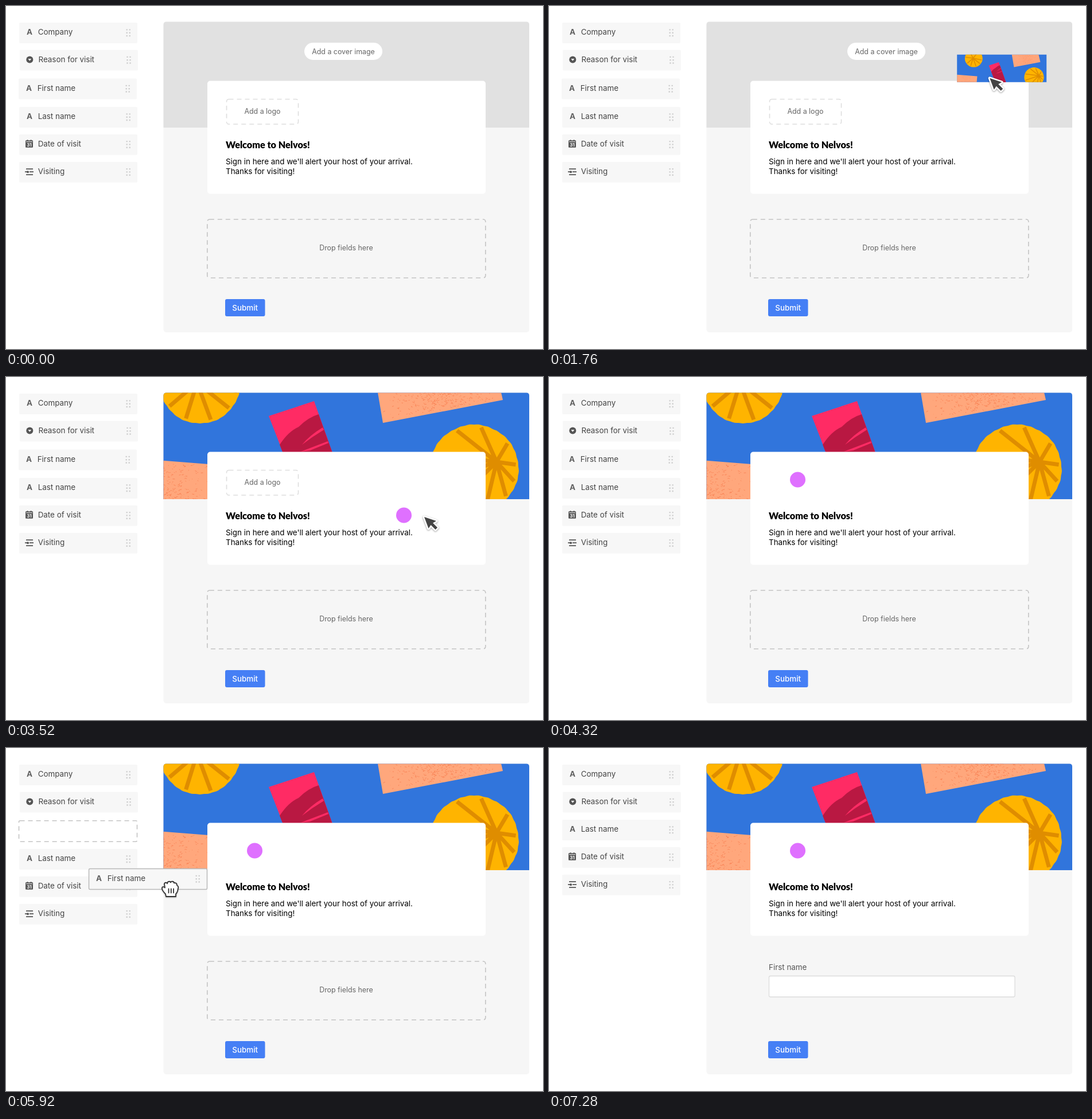
Write an HTML page that moves like this. It is 936 px wide and 598 px high and loops after 8000 ms.

```html
<!DOCTYPE html>
<html lang="en">
<head>
<meta charset="utf-8">
<title>Form builder</title>
<style>
  html, body { margin: 0; width: 100%; height: 100%; overflow: hidden; background: #fff; }
  #stage { display: block; width: 936px; height: 598px; font: 13.4px Inter, sans-serif; fill: #444; }
  .small { font-size: 12.4px; fill: #666; text-anchor: middle; }
  .dash { fill: none; stroke: #c4c4c4; stroke-width: 1.6; stroke-dasharray: 8 6; }
  .glyph { font-weight: 700; fill: #606060; }
  .pointer { fill: #444; stroke: #fff; stroke-width: 5; stroke-linejoin: round; paint-order: stroke;
    filter: drop-shadow(0 1px 1.5px #0006); }
</style>
</head>
<body>
<svg id="stage" viewBox="0 0 936 598">
  <defs>
    <clipPath id="coverClip"><path d="M274.500 213V32.500q0-5 5-5H907q5 0 5 5V213z"/></clipPath>
    <path id="pointer" class="pointer" d="M0 0L7.500 20 11.500 14 19.500 22 23 18.500 15 10.500 21 7z"/>
    <path id="grip" stroke="#d0d0d0" stroke-width="2.400" stroke-dasharray="2.400 2.900" d="M187.700 11.200v14M192.700 11.200v14"/>
    <g id="art">
      <path fill="#3175dc" d="M200-25h720v250H200z"/>
      <path id="lemonLeft" fill="#ffb400"/>
      <path id="lemonRight" fill="#ffb400"/>
      <path id="spokes" fill="none" stroke="#df8d00" stroke-width="7"/>
      <path fill="#ff2b64" d="M458 68L537 42 595 205 525 240z"/>
      <path fill="#b91842" d="M477 118Q492 95 510 87 527 70 545 65L595 205 525 240z"/>
      <path fill="#ff2b64" d="M516 118Q530 101 552 88L554 92Q534 104 516 118zM514 130L561 112 562 115 530 128z"/>
      <path fill="#ffa77c" d="M200 140L366 153 358 240 200 240zM640-20L657 80 866 40 852-20z"/>
      <path id="grain" fill="none" stroke="#f4683a" stroke-width=".9" opacity=".6"/>
    </g>
  </defs>

  <rect x="274.500" y="27.500" width="637.500" height="541.500" rx="5" fill="#f6f6f6"/>
  <path fill="#e1e1e1" d="M274.500 212V32.500q0-5 5-5H907q5 0 5 5V212z"/>
  <rect x="520" y="64" width="136" height="30" rx="15" fill="#fff"/>
  <text class="small" x="588" y="83.500">Add a cover image</text>
  <g id="cover" clip-path="url(#coverClip)"><use href="#art"/></g>

  <rect x="351" y="130.500" width="485" height="197" rx="5" fill="#fff"/>
  <g id="logoSlot">
    <rect class="dash" x="384.500" y="162.500" width="125" height="43.500" rx="4" style="stroke:#dedede"/>
    <text class="small" x="447" y="187.500">Add a logo</text>
  </g>
  <text x="383" y="248" fill="#000" style="font:900 16.200px Lato,sans-serif">Welcome to Nelvos!</text>
  <text x="383" y="275.500" fill="#000">Sign in here and we'll alert your host of your arrival.</text>
  <text x="383" y="293" fill="#000">Thanks for visiting!</text>

  <g id="dropZone">
    <rect class="dash" x="350.800" y="372" width="485" height="102" rx="4"/>
    <text class="small" x="593" y="426">Drop fields here</text>
  </g>
  <g id="field">
    <text x="383" y="386.500" fill="#555">First name</text>
    <rect x="383.500" y="397.500" width="428.500" height="36.500" rx="2.500" fill="#fff" stroke="#dcdcdc" stroke-width="1.300"/>
  </g>
  <rect x="382" y="511" width="69.500" height="30" rx="3" fill="#457ff5"/>
  <text x="416.700" y="530.500" fill="#fff" text-anchor="middle" font-weight="500">Submit</text>

  <g id="fixedItems"></g>
  <rect id="gap" class="dash" x="22.500" y="126.700" width="206" height="36.500" rx="2"/>
  <g id="looseItems"></g>

  <g id="thumb">
    <svg width="156" height="48" viewBox="205.800 -18.500 709 218.200"><use href="#art"/></svg>
    <use href="#pointer" x="57" y="41"/>
  </g>
  <g id="logo">
    <circle cx="50.500" cy="13" r="13.500" fill="#df70ff"/>
    <use id="logoPointer" href="#pointer" x="86" y="16"/>
  </g>
  <g id="drag">
    <g id="dragItem"></g>
    <g id="hand" transform="translate(127 21.500)" stroke="#333" stroke-width="1.800" stroke-linecap="round" stroke-linejoin="round">
      <path fill="#fff" style="filter:drop-shadow(0 1px 1px #0004)" d="M8 27.500L7 23C4 20 1 16 1 13 1 10 4 10 6 12L5 6C5 3 9 2 10 5 10 1 15 0 16 3 17 0 22 1 22 4 24 3 27 4 27 8 29 9 30 10 29 13L28 18Q27 21 25 23V27.500z"/>
      <path fill="none" d="M12.500 14v7M16.800 14v7M21 14v7"/>
    </g>
  </g>
</svg>
<script>
const LOOP = 8000, STEP = 80;
const $ = id => document.getElementById(id);

// Sidebar
const icons = {
  text: '<text class="glyph" x="13" y="21">A</text>',
  choice: '<circle cx="17.500" cy="17" r="6" fill="#555"/><path fill="#fff" d="M14.700 15.500h5.600l-2.800 3.700z"/>',
  date: `<path fill="#555" d="M11 11.500q0-1 1-1h1.500v-1h2v1h4v-1h2v1H23q1 0 1 1V22q0 1-1 1H12q-1 0-1-1z"/>
    <path stroke="#f7f7f7" d="M12 13h11"/><text x="17.500" y="21" text-anchor="middle" fill="#fff" font-size="8" font-weight="700">31</text>`,
  visit: '<path stroke="#555" stroke-width="1.800" d="M12 12.500h12M10 17.500h6M18 17.500h7M12 22.500h12"/><circle cx="15" cy="17.500" r="2" fill="#555"/>'
};
const item = (x, y, icon, label) => `<g transform="translate(${x} ${y})">
  <rect width="206" height="36" rx="2" fill="#f7f7f7"/>${icons[icon]}
  <text x="32.700" y="21">${label}</text><use href="#grip"/></g>`;

$('fixedItems').innerHTML = item(23, 29, 'text', 'Company') + item(23.8, 76.5, 'choice', 'Reason for visit');
$('looseItems').innerHTML = item(23, 176, 'text', 'Last name') +
  item(23, 223.7, 'date', 'Date of visit') + item(23, 271.7, 'visit', 'Visiting');
$('dragItem').innerHTML = item(0, 0.5, 'text', 'First name') +
  '<rect id="outline" x=".5" y=".5" width="206" height="36" rx="2" fill="none" stroke="#b9b9b9" stroke-width="1.500"/>';

// Cover artwork
const polar = (cx, cy, rx, ry, a) => `${(cx + rx * Math.cos(a)).toFixed(1)} ${(cy + ry * Math.sin(a)).toFixed(1)}`;
const blob = (cx, cy, rx, ry) => 'M' + Array.from({ length: 120 }, (_, i) => {
  const a = i * Math.PI / 60, k = 1 + 0.005 * Math.sin(7 * a) + 0.005 * Math.sin(29 * a);
  return polar(cx, cy, rx * k, ry * k, a);
}).join('L') + 'z';
const rays = (hx, hy, cx, cy, rx, ry, angles) =>
  angles.map(a => `M${hx} ${hy}L${polar(cx, cy, rx, ry, a)}`).join('');
$('lemonLeft').setAttribute('d', blob(338, 12, 70, 69));
$('lemonRight').setAttribute('d', blob(816, 160, 77.5, 77));
$('spokes').setAttribute('d',
  rays(333, 10, 338, 12, 66, 65, [0.2, 0.7, 1.28, 1.95, 2.5, 3.3, 4.2, 5.3]) +
  rays(855, 148, 816, 160, 73, 73, [-0.65, -0.1, 0.3, 0.71, 1.3, 2.1, 2.8, 3.5, 4.29, 4.88]));

let seed = 7;
const random = () => (seed = seed * 16807 % 2147483647) / 2147483647;
let grain = '';
for (let i = 0; i < 900; i++) {
  const u = (random() + random()) / 2, v = random();
  const [x, y] = i % 3 ? [652 + u * 204, -15 + v * (92 - u * 38)] : [205 + u * 150, 147 + u * 8 + v * 70];
  grain += `M${x.toFixed(1)} ${y.toFixed(1)}l${(random() * 5 - 1).toFixed(1)} ${(random() * 4 - 2).toFixed(1)}`;
}
$('grain').setAttribute('d', grain);

// Motion: smooth curve through keys of [time, ...values], at rest at both ends
function glide(t, keys) {
  const last = keys.length - 1;
  if (t <= keys[0][0]) return keys[0].slice(1);
  if (t >= keys[last][0]) return keys[last].slice(1);
  const i = keys.findIndex(k => k[0] > t) - 1, [a, b] = [keys[i], keys[i + 1]];
  const slope = (j, n) => (keys[j + 1][n] - keys[j][n]) / (keys[j + 1][0] - keys[j][0]);
  const tangent = (j, n) => j === 0 || j === last ? 0 : (slope(j - 1, n) + slope(j, n)) / 2;
  const d = b[0] - a[0], s = (t - a[0]) / d, r = 1 - s;
  return a.slice(1).map((v, k) => {
    const n = k + 1;
    return v + (b[n] - v) * s * s * (3 - 2 * s) + d * s * r * (tangent(i, n) * r - tangent(i + 1, n) * s);
  });
}
const ramp = (t, a, b) => Math.min(1, Math.max(0, (t - a) / (b - a)));
const move = (id, [x, y]) => $(id).setAttribute('transform', `translate(${x.toFixed(2)} ${y.toFixed(2)})`);
const fade = (id, alpha) => { $(id).style.opacity = alpha; };

const thumbPath = [[1040, 939, 224], [2000, 669, 59]];
const logoPath = [[2800, 940, 297], [3520, 643, 228], [3680, 548, 205], [4080, 383, 166]];
const dragPath = [[5200, 22, 126], [5920, 144, 210], [6080, 188.5, 240.5], [6880, 383, 375]];
const listShift = [[6960, 0], [7280, -51]];

function draw(t) {
  move('thumb', glide(t, thumbPath));
  fade('thumb', 1 - ramp(t, 2080, 2240));
  fade('cover', ramp(t, 2080, 2240));

  move('logo', glide(t, logoPath));
  fade('logoPointer', 1 - ramp(t, 4160, 4320));
  fade('logoSlot', t < 4080 ? 1 : 0);

  move('drag', glide(t, dragPath));
  fade('outline', ramp(t, 4880, 5040));
  fade('hand', ramp(t, 4880, 5040) - ramp(t, 6960, 7120));
  fade('dragItem', 1 - ramp(t, 6880, 7040));
  fade('gap', t >= 5040 && t < 7040 ? 1 : 0);
  fade('field', ramp(t, 6880, 7040));
  fade('dropZone', 1 - ramp(t, 6960, 7120));
  move('looseItems', [0, glide(t, listShift)[0]]);
}
const start = performance.now();
function tick() {
  draw(Math.floor((performance.now() - start) % LOOP / STEP) * STEP);
  requestAnimationFrame(tick);
}
tick();
</script>
</body>
</html>
```
